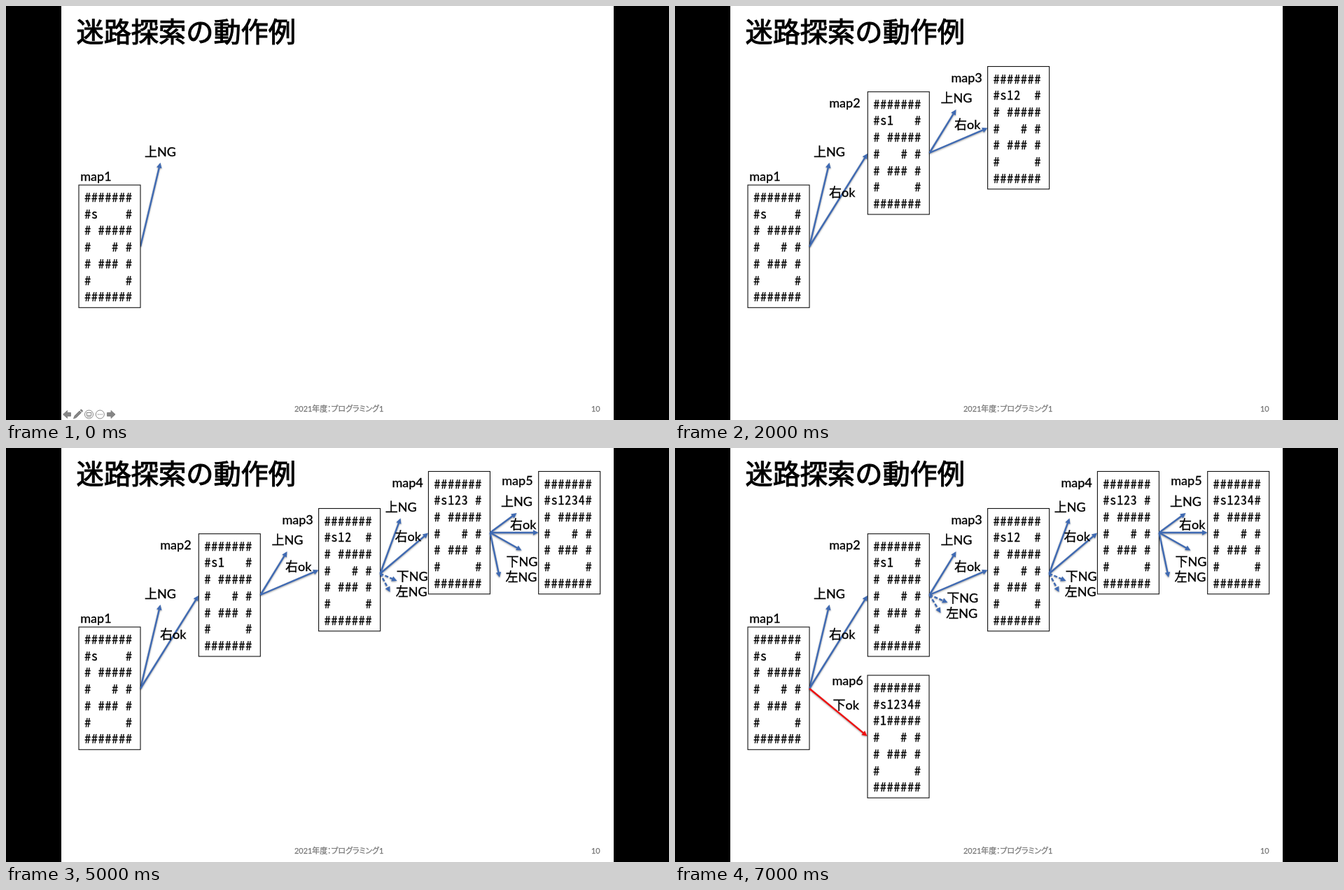
An HTML page that plays this animation: 947x592 px, repeating every 8000 ms.

```html
<!DOCTYPE html>
<html lang="ja">
<head>
<meta charset="utf-8">
<title>迷路探索の動作例</title>
<style>
html, body { margin: 0; width: 100%; height: 100%; overflow: hidden; background: #000; }
svg { display: block; width: 947px; height: 592px; }
text { font-family: Lato, "Noto Sans CJK JP", "Noto Sans CJK", sans-serif; font-size: 18px; white-space: pre; stroke: #000; stroke-width: .35; }
.title { font-size: 39.2px; font-weight: 500; stroke-width: 1.1; }
.foot { font-size: 10.9px; fill: #757575; stroke: #757575; stroke-width: .25; font-feature-settings: "palt"; }
.maze { font-family: "Noto Sans Mono CJK JP", "Noto Sans CJK JP", "Noto Sans Mono", monospace; font-size: 17.8px; text-anchor: middle; stroke-width: .3; }
.box { fill: #fff; stroke: #111; stroke-width: 1.1; }
.arrows { filter: drop-shadow(0 1.3px 1px rgba(0, 0, 0, .38)); }
.arrow { stroke: #3f6ab3; fill: #3f6ab3; stroke-width: 2.4; }
.dash line { stroke-dasharray: 5 2.5; }
.red { stroke: #ee1111; fill: #ee1111; }
.tools { fill: #858585; stroke: #858585; stroke-width: 1; }
.step { animation: 8s step-end infinite; }
@keyframes tools { 0% { opacity: 1 } 12.5%, 100% { opacity: 0 } }
@keyframes s1 { 0% { opacity: 0 } 12.5%, 100% { opacity: 1 } }
@keyframes s2 { 0% { opacity: 0 } 25%, 100% { opacity: 1 } }
@keyframes s3 { 0% { opacity: 0 } 37.5%, 100% { opacity: 1 } }
@keyframes s4 { 0% { opacity: 0 } 50%, 100% { opacity: 1 } }
@keyframes s5 { 0% { opacity: 0 } 62.5%, 100% { opacity: 1 } }
@keyframes s6 { 0% { opacity: 0 } 75%, 100% { opacity: 1 } }
@keyframes s7 { 0% { opacity: 0 } 87.5%, 100% { opacity: 1 } }
</style>
</head>
<body>
<svg viewBox="0 0 947 592">
  <rect x="79" width="789" height="592" fill="#fff"/>
  <text class="title" x="100.5" y="51">迷路探索の動作例</text>
  <text class="foot" x="412" y="580">2021年度：プログラミング1</text>
  <text class="foot" x="836" y="580">10</text>
  <g class="tools step" style="animation-name: tools">
    <path d="M81.5 584l6-5.5v3h5v5h-5v3z"/>
    <path d="M96.5 590l1.5-4 7-7 2.5 2.5-7 7zM106 578l1.5-1.2 2.2 2.2-1.2 1.5z"/>
    <g fill="none">
      <circle cx="118.5" cy="584" r="6"/>
      <rect x="115.3" y="581.5" width="6.4" height="4"/>
      <path d="M115.5 587.5h6"/>
      <circle cx="134.3" cy="584" r="6"/>
    </g>
    <path d="M131 584h1.2m1.5 0h1.2m1.5 0h1.2" stroke-width="1.4"/>
    <path d="M156 584l-6-5.5v3h-5.5v5h5.5v3z"/>
  </g>
  <g id="scene"></g>
</svg>
<script>
const maze = (row1, row2 = "# #####") =>
  ["#######", row1, row2, "#   # #", "# ### #", "#     #", "#######"];

const box = (x, y, rows) =>
  `<rect class="box" x="${x}" y="${y}" width="88" height="175.3"/>` +
  rows.map((row, r) => [...row].map((ch, c) => ch === " " ? "" :
    `<text class="maze" x="${x + 12.6 + c * 9.8}" y="${y + 24 + r * 23.7}">${ch}</text>`
  ).join("")).join("");

const label = (s, x, y) => `<text x="${x}" y="${y}">${s}</text>`;

function arrow(x1, y1, x2, y2, kind = "") {
  const len = Math.hypot(x2 - x1, y2 - y1);
  const deg = Math.atan2(y2 - y1, x2 - x1) * 180 / Math.PI;
  return `<g class="arrow ${kind}" transform="translate(${x1} ${y1}) rotate(${deg})">` +
    `<line x2="${len - 6}"/><path stroke="none" d="M${len} 0l-7.5-3.8v7.6z"/></g>`;
}

const step = (n, arrows, rest) =>
  `<g class="step" style="animation-name: s${n}"><g class="arrows">${arrows}</g>${rest}</g>`;

document.getElementById("scene").innerHTML = [
  step(0,
    arrow(192, 344, 220.5, 224),
    box(104, 256, maze("#s    #")) + label("map1", 106.3, 250) + label("上NG", 198, 214.5)),
  step(1,
    arrow(192, 344, 275, 211),
    box(275.3, 122.7, maze("#s1   #")) + label("map2", 220.3, 145) + label("右ok", 220, 273)),
  step(2,
    arrow(363.5, 210, 401.5, 148) + arrow(363.5, 210, 446.5, 174.5),
    box(446.6, 86.5, maze("#s12  #")) + label("map3", 394.5, 109) +
    label("上NG", 379.5, 138) + label("右ok", 399, 175.5)),
  step(3,
    arrow(534.5, 179.5, 563.5, 100.5) + arrow(534.5, 179.5, 603, 121.5),
    box(603.4, 33.5, maze("#s123 #")) + label("map4", 551.5, 55.5) +
    label("上NG", 541.7, 91.2) + label("右ok", 555.5, 133)),
  step(4,
    arrow(691.5, 121, 729.5, 93) + arrow(691.5, 121, 760.5, 121) +
    arrow(691.5, 121, 736.5, 146.5) + arrow(691.5, 121, 705, 185),
    box(760.7, 33.5, maze("#s1234#")) + label("map5", 708.3, 53) +
    label("上NG", 707, 82.5) + label("右ok", 720, 116) +
    label("下NG", 714.5, 169.2) + label("左NG", 713.5, 191)),
  step(5,
    arrow(534.5, 179.5, 558.5, 190, "dash") + arrow(534.5, 179.5, 548.5, 206, "dash"),
    label("下NG", 557.7, 190) + label("左NG", 556.7, 211.7)),
  step(6,
    arrow(363.5, 210, 389.5, 221, "dash") + arrow(363.5, 210, 379.5, 236, "dash"),
    label("下NG", 388.3, 221) + label("左NG", 387.3, 243)),
  step(7,
    arrow(192, 344, 274.5, 412, "red"),
    box(275, 325, maze("#s1234#", "#1#####")) + label("map6", 224.5, 339) + label("下ok", 225.5, 374))
].join("");
</script>
</body>
</html>
```
